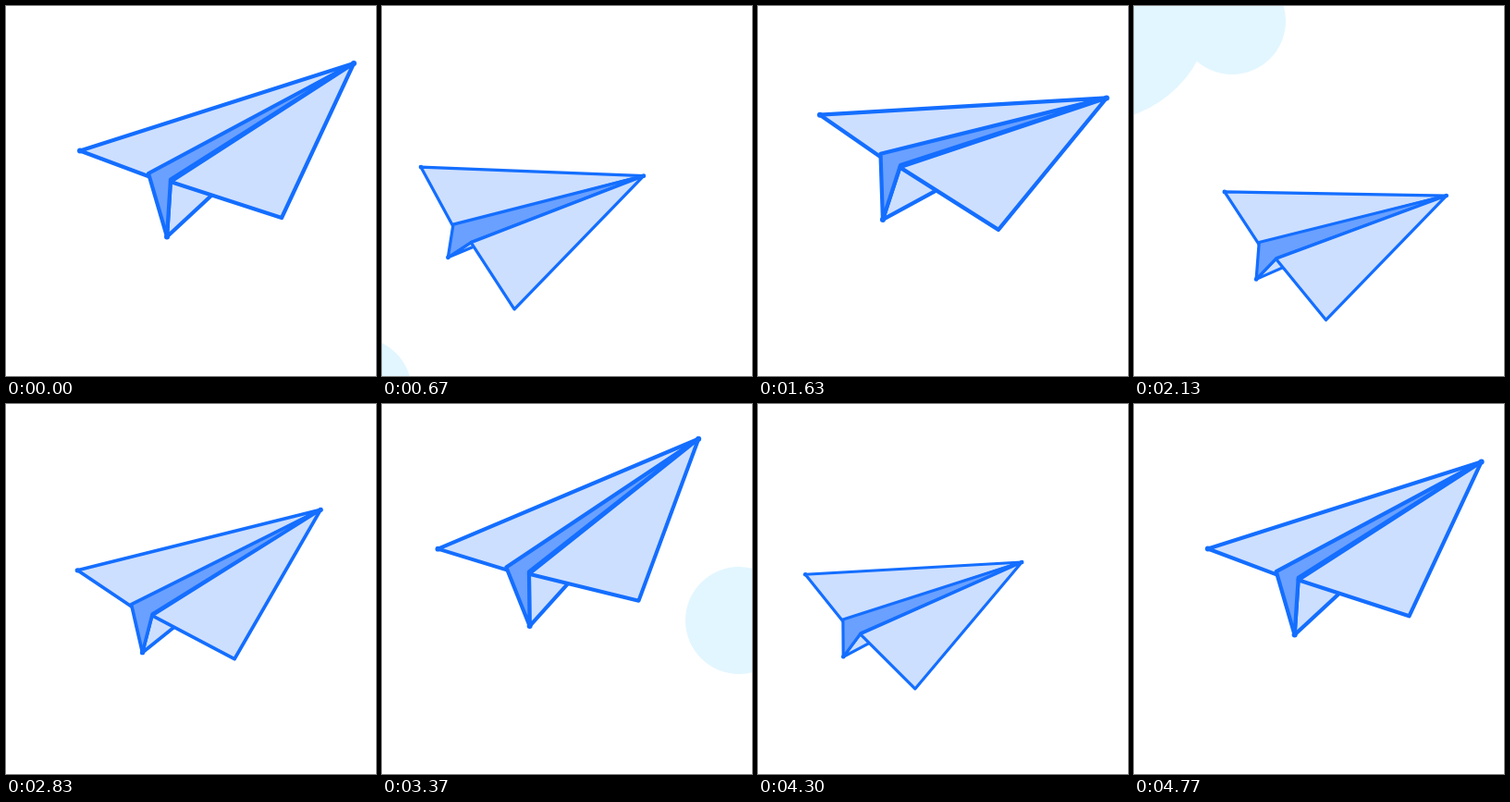
Recreate the animation shown at these times as an HTML page with a canvas. Size 400x400 px, loop 4.81 s.

```html
<!DOCTYPE html>
<html>
<head>
<meta charset="utf-8">
<style>
  html, body { margin: 0; width: 100%; height: 100%; overflow: hidden; background: #fff; }
  canvas { display: block; width: 100vmin; height: 100vmin; }
</style>
</head>
<body>
<canvas id="stage" width="400" height="400"></canvas>
<script>
const ctx = document.getElementById('stage').getContext('2d');
const LOOP = 4810, HALF = 800;
const LIGHT = '#cddfff', FOLD = '#6aa0ff', LINE = '#146eff', CLOUD = '#e2f6ff';

// Corners relative to the nose, when climbing and when diving
const climb = { left: [-296, 94.5], outer: [-222, 119], inner: [-198, 125.5], keel: [-202, 187.5], right: [-78, 167] };
const dive = { left: [-238, -15], outer: [-205, 49], inner: [-185, 68.5], keel: [-212, 83], right: [-143, 143] };

// The plane alternates between climb and dive, one key every HALF ms
const keys = [
  { x: 376, y: 62, angle: 0, scale: 1 },
  { x: 278, y: 190, angle: 0, scale: 1 },
  { x: 377, y: 99, angle: 0.25, scale: 1 },
  { x: 326, y: 236.5, angle: 0, scale: 0.94 },
  { x: 351, y: 21, angle: -0.127, scale: 1.02 },
  { x: 249, y: 214.5, angle: 0.01, scale: 0.887 }
];

const clouds = [
  { start: 0, length: 783, y: 416 },
  { start: 1635, length: 724, y: 16 },
  { start: 3205, length: 787, y: 234 }
];

const mix = (a, b, p) => a + (b - a) * p;
const mixPoint = (a, b, p) => [mix(a[0], b[0], p), mix(a[1], b[1], p)];

function ease(u) {
  const a = u ** 1.8, b = (1 - u) ** 1.8;
  return a / (a + b);
}

function disc(x, y, r, fill) {
  ctx.fillStyle = fill;
  ctx.beginPath();
  ctx.arc(x, y, r, 0, 2 * Math.PI);
  ctx.fill();
}

function panel(fill, ...points) {
  ctx.fillStyle = fill;
  ctx.beginPath();
  points.forEach(p => ctx.lineTo(...p));
  ctx.closePath();
  ctx.fill();
  ctx.stroke();
}

function drawCloud({ start, length, y }, t) {
  const u = (t - start) / length;
  if (u < 0 || u > 1) return;
  const x = mix(763, -58, ease(u));
  disc(x, y, 58, CLOUD);
  disc(x - 148, y - 17.5, 126, CLOUD);
  disc(x - 308, y, 58, CLOUD);
}

function drawPlane(t) {
  const step = t / HALF, i = Math.floor(step), p = ease(step - i);
  const from = keys[i % keys.length], to = keys[(i + 1) % keys.length];
  const at = name => mix(from[name], to[name], p);
  const scale = at('scale'), diving = i % 2 ? 1 - p : p;
  const cos = scale * Math.cos(at('angle')), sin = scale * Math.sin(at('angle'));
  const corner = name => {
    const [x, y] = mixPoint(climb[name], dive[name], diving);
    return [at('x') + x * cos - y * sin, at('y') + x * sin + y * cos];
  };
  const nose = [at('x'), at('y')];
  const [left, outer, inner, keel, right] = Object.keys(climb).map(corner);

  ctx.lineWidth = Math.hypot(nose[0] - left[0], nose[1] - left[1]) / 74;
  ctx.lineJoin = 'round';
  ctx.strokeStyle = LINE;
  panel(LIGHT, nose, left, mixPoint(outer, keel, 0.05));
  panel(LIGHT, nose, keel, inner);
  panel(FOLD, nose, outer, keel, inner);
  panel(LIGHT, nose, mixPoint(inner, keel, 0.04), right);
  [nose, left, keel].forEach(tip => disc(...tip, ctx.lineWidth * 0.72, LINE));
}

function draw(now) {
  const t = now % LOOP;
  ctx.clearRect(0, 0, 400, 400);
  clouds.forEach(c => drawCloud(c, t));
  drawPlane(Math.min(t, keys.length * HALF));
}

let origin;
function tick(now) {
  origin ??= now;
  draw(now - origin);
  requestAnimationFrame(tick);
}
draw(0);
requestAnimationFrame(tick);
</script>
</body>
</html>
```
